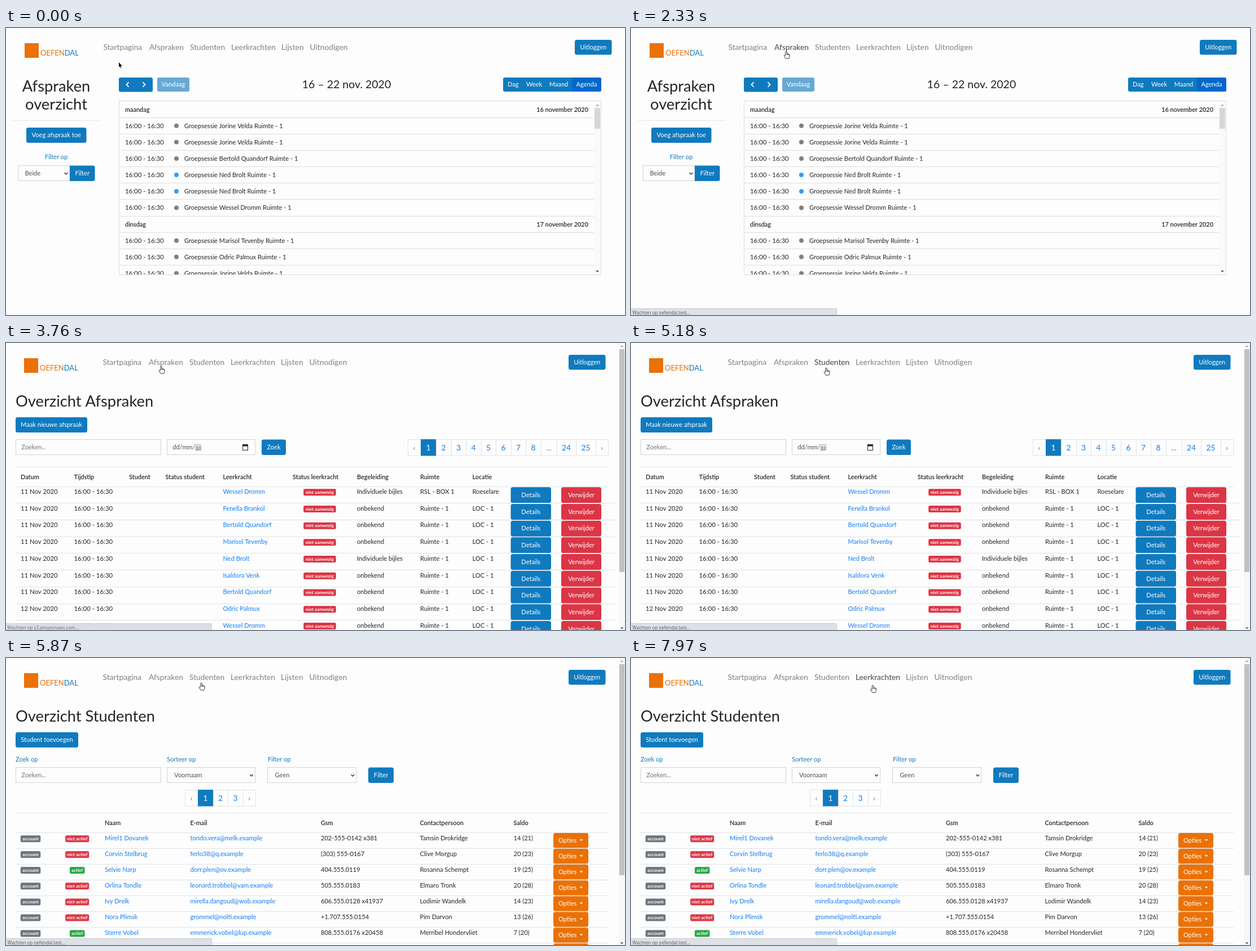
An HTML page with a canvas for the animation above (8 s loop, 1097x510 px).

```html
<!DOCTYPE html>
<html lang="nl">
<head>
<meta charset="utf-8">
<title>Afspraken</title>
<style>
html, body { margin: 0; width: 100%; height: 100%; overflow: hidden; background: #fdfdfd; }
canvas { display: block; }
</style>
</head>
<body>
<canvas id="stage" width="1097" height="510"></canvas>
<script>
const ctx = document.getElementById('stage').getContext('2d');
const LOOP = 8000;
const BG = '#fdfdfd', BLUE = '#107abe', RED = '#dc3545', GREEN = '#28a745', GREY = '#6c757d';
const ORANGE = '#ea7106', LINK = '#147df5', INK = '#212529', LINE = '#dee2e6', FIELD = '#ced4da';
const BODY = 11.1, NAV = 13.8, TITLE = 27.3;
const SITE = 'oefendal.test';

// Drawing helpers
function text(s, x, y, { size = BODY, color = INK, align = 'left', weight = 400, family = 'Lato' } = {}) {
  ctx.font = `${weight} ${size}px ${family}, sans-serif`;
  ctx.textAlign = align;
  ctx.fillStyle = color;
  ctx.fillText(s, x, y);
  return ctx.measureText(s).width;
}
const bold = (s, x, y, align) => text(s, x, y, { size: 10.9, weight: 600, align });

function box(x, y, w, h, color, r = 0) {
  ctx.fillStyle = color;
  ctx.beginPath();
  ctx.roundRect(x, y, w, h, r);
  ctx.fill();
}

function frame(x, y, w, h, color = FIELD) {
  ctx.strokeStyle = color;
  ctx.lineWidth = 1;
  ctx.strokeRect(x, y, w, h);
}

const rule = (x1, x2, y, color = LINE) => box(x1, Math.round(y), x2 - x1, 1, color);

function button(label, x, y, w, h, color = BLUE, r = 3.5) {
  box(x, y, w, h, color, r);
  text(label, x + w / 2, y + h / 2 + 3.8, { color: '#fff', align: 'center' });
}

function badge(label, cx, cy, w, color) {
  box(cx - w / 2, cy - 6, w, 12, color, 2.5);
  text(label, cx, cy + 2.8, { size: 8.2, weight: 700, color: '#fff', align: 'center' });
}

function poly(points, color) {
  ctx.fillStyle = color;
  ctx.beginPath();
  points.forEach(([x, y]) => ctx.lineTo(x, y));
  ctx.closePath();
  ctx.fill();
}
const triangle = (x, y, w, h, color) => poly([[x - w, y - h], [x + w, y - h], [x, y + h]], color);

function chevron(x, y, dx, dy, color, width) {
  ctx.strokeStyle = color;
  ctx.lineWidth = width;
  ctx.beginPath();
  if (dy > 0) { ctx.moveTo(x - dx, y - dy / 2); ctx.lineTo(x, y + dy / 2); ctx.lineTo(x + dx, y - dy / 2); }
  else { ctx.moveTo(x - dx / 2, y + dy); ctx.lineTo(x + dx / 2, y); ctx.lineTo(x - dx / 2, y - dy); }
  ctx.stroke();
}

function select(label, x, y, w, pad) {
  frame(x, y, w, 27);
  text(label, x + pad, y + 17.3, { color: '#495057' });
  chevron(x + w - 6.5, y + 14, 2.8, 3, '#333', 1.4);
}

function input(x, y, w, label, color = GREY) {
  frame(x, y, w, 27);
  text(label, x + 9.8, y + 17.3, { color });
}

function pager(labels, edges, y) {
  labels.forEach((label, i) => {
    const x = edges[i], w = edges[i + 1] - x, active = label === '1';
    if (active) box(x, y, w, 29.5, BLUE);
    else frame(x + .5, y + .5, w, 28.5, LINE);
    const color = active ? '#fff' : '‹...'.includes(label) ? GREY : LINK;
    text(label, x + w / 2, y + 19.8, { size: NAV, color, align: 'center' });
  });
}

// Shared page parts
const links = [
  ['Startpagina', 172.5, 'home'], ['Afspraken', 254, 'meetings'], ['Studenten', 326, 'students'],
  ['Leerkrachten', 399, 'teachers'], ['Lijsten', 488, 'lists'], ['Uitnodigen', 538.5, 'invites']
];

function header(shift, hovered) {
  box(33 - shift, 27, 25, 26, ORANGE);
  const w = text('OEFEN', 61 - shift, 49, { size: 13, color: ORANGE });
  text('DAL', 61 - shift + w, 49, { size: 13, color: BLUE });
  links.forEach(([label, x], i) =>
    text(label, x - shift, 38.5, { size: NAV, color: i === hovered ? '#444' : '#808080' }));
  button('Uitloggen', shift ? 997 : 1008, 21, 65.5, 26.5);
}

function pageScroll(end) {
  box(1086, 0, 11, 510, '#f7f7f7');
  box(1087, 11, 9, end - 11, '#c1c1c1');
  triangle(1091.5, 5.5, 2.7, -1.5, '#a0a0a0');
  triangle(1091.5, 507, 2.7, 1.5, '#505050');
}

// Calendar page
const people = {
  jv: 'Jorine Velda', bq: 'Bertold Quandorf', nb: 'Ned Brolt', wd: 'Wessel Dromm',
  mt: 'Marisol Tevenby', op: 'Odric Palmux', fb: 'Fenella Brankol', iv: 'Isaldora Venk'
};
const agenda = ['maandag|16', 'jv', 'jv', 'bq', 'nb', 'nb', 'wd', 'dinsdag|17', 'mt', 'op', 'jv'];

function calendarPage(hovered) {
  header(0, hovered);
  const big = { size: TITLE, align: 'center' };
  text('Afspraken', 89, 113, big);
  text('overzicht', 89, 145, big);
  rule(11, 168, 164, '#e6e6e6');
  button('Voeg afspraak toe', 36, 177, 106.5, 27);
  text('Filter op', 89, 233.3, { color: BLUE, align: 'center' });
  select('Beide', 21.5, 244.5, 91.5, 12);
  button('Filter', 113, 244.5, 44.5, 27.5, BLUE, [0, 3.5, 3.5, 0]);

  box(200, 88, 60, 25.5, BLUE, 3);
  chevron(215.5, 100.5, -4, -4.2, '#fff', 1.8);
  chevron(244.5, 100.5, 4, -4.2, '#fff', 1.8);
  button('Vandaag', 268, 88, 57, 25, '#67a9d5', 3);
  text('16 – 22 nov. 2020', 603.5, 106.5, { size: 19.5, align: 'center' });
  box(881, 88, 174, 25, BLUE, 3);
  button('Agenda', 1003, 88, 52, 25, '#0467ca', [0, 3, 3, 0]);
  [['Dag', 898.7], ['Week', 936], ['Maand', 979.5]].forEach(([s, x]) =>
    text(s, x, 104.3, { color: '#fff', align: 'center' }));

  ctx.save();
  ctx.beginPath();
  ctx.rect(200, 129, 855, 309.5);
  ctx.clip();
  agenda.forEach((item, i) => {
    const y = 144.5 + 29.15 * i, base = y + 4;
    const [day, date] = item.split('|');
    if (date) {
      bold(day, 211, base);
      bold(date + ' november 2020', 1032, base, 'right');
    } else {
      text('16:00 - 16:30', 211, base, { size: 11.4 });
      box(298, y - 4, 8, 8, item === 'nb' ? '#2f9ff5' : '#808080', 4);
      text(`Groepsessie ${people[item]} Ruimte - 1`, 316, base);
    }
    rule(200, 1042, y + 14.2, '#ddd');
  });
  ctx.restore();
  frame(200.5, 129.5, 854, 309, '#ddd');
  box(1042, 130, 12, 308, '#fafafa');
  box(1043, 142, 10, 37, '#d6d6d6');
  triangle(1048, 137, 2.7, -1.5, '#a0a0a0');
  triangle(1048, 432.5, 2.7, 1.5, '#404040');
}

// Meetings page
const teachers = ['wd', 'fb', 'bq', 'mt', 'nb', 'iv', 'bq', 'op', 'wd'];
const meetingCols = [
  ['Datum', 26], ['Tijdstip', 120.5], ['Student', 218], ['Status student', 282.5], ['Leerkracht', 384.5],
  ['Status leerkracht', 508], ['Begeleiding', 622], ['Ruimte', 734], ['Locatie', 826.5]
];

function meetingsPage(hovered) {
  header(1, hovered);
  text('Overzicht Afspraken', 17, 112.5, { size: TITLE });
  button('Maak nieuwe afspraak', 17, 132, 127, 27);
  input(17.5, 171.5, 257, 'Zoeken...');
  input(285.5, 171.5, 156, 'dd/mm/jjjj', '#495057');
  frame(419.5, 181, 9, 9.5, '#222');
  box(419, 180, 10, 3.5, '#222');
  button('Zoek', 453, 171.5, 43, 27.5);
  pager(['‹', '1', '2', '3', '4', '5', '6', '7', '8', '...', '24', '25', '›'],
    [712, 735, 762, 789, 815, 842, 868, 895, 921, 948, 976, 1010, 1045, 1067], 171);

  rule(17, 1068, 220);
  meetingCols.forEach(([s, x]) => bold(s, x, 241.7));
  teachers.forEach((id, i) => {
    const y = 264 + 29.72 * i, base = y + 4, single = i === 0 || i === 4;
    rule(17, i ? 1079 : 1068, y - 9.5);
    text((i < 7 ? '11' : '12') + ' Nov 2020', 26, base, { size: 11.3 });
    text('16:00 - 16:30', 120.5, base, { size: 11.4 });
    text(people[id], 384.5, base, { color: LINK });
    badge('niet aanwezig', 556, y + 1.2, 57.5, RED);
    text(single ? 'Individuele bijles' : 'onbekend', 622, base);
    text(i ? 'Ruimte - 1' : 'RSL - BOX 1', 734, base);
    text(i ? 'LOC - 1' : 'Roeselare', 826.5, base);
    button('Details', 894.5, y - 7.8, 71.5, 28);
    button('Verwijder', 984, y - 7.8, 71, 28, RED);
  });
  pageScroll(407);
}

// Students page
const students = [
  ['Mirel1 Dovanek', 'tondo.vera@melk.example', '202-555-0142 x381', 'Tamsin Drokridge', '14 (21)'],
  ['Corvin Stelbrug', 'ferlo38@q.example', '(303) 555-0167', 'Clive Morgup', '20 (23)'],
  ['Selvie Narp', 'dorr.plen@ov.example', '404.555.0119', 'Rosanna Schempt', '19 (25)'],
  ['Orlina Tondle', 'leonard.trobbel@vam.example', '505.555.0183', 'Elmaro Tronk', '20 (28)'],
  ['Ivy Drelk', 'mirella.dangoud@wob.example', '606.555.0128 x41937', 'Lodimir Wandelk', '14 (23)'],
  ['Nora Plimsk', 'grommel@nolti.example', '+1.707.555.0154', 'Pim Darvon', '13 (26)'],
  ['Sterre Vobel', 'emmerick.vobel@lup.example', '808.555.0176 x20458', 'Merribel Hondervliet', '7 (20)']
];
const studentCols = [['Naam', 175], ['E-mail', 326.5], ['Gsm', 558], ['Contactpersoon', 733.5], ['Saldo', 899.5]];

function studentsPage(hovered) {
  header(1, hovered);
  text('Overzicht Studenten', 17, 112.5, { size: TITLE });
  button('Student toevoegen', 17, 132, 111, 27);
  [['Zoek op', 17], ['Sorteer op', 285], ['Filter op', 464]].forEach(([s, x]) =>
    text(s, x, 183.8, { color: BLUE }));
  input(17.5, 194.5, 257, 'Zoeken...');
  select('Voornaam', 285.5, 194.5, 156, 12.5);
  select('Geen', 463.5, 194.5, 157.5, 13);
  button('Filter', 642, 194.5, 45, 27.5);
  pager(['‹', '1', '2', '3', '›'], [317, 340, 367, 393, 420, 442], 234);

  rule(17, 1068, 275);
  studentCols.forEach(([s, x]) => bold(s, x, 297.2));
  for (let i = 0; i < 8; i++) {
    const y = 320 + 28.05 * i, row = students[i];
    rule(17, 1068, y - 10);
    box(970, y - 9, 62, 26.5, ORANGE, 3.5);
    text('Opties', 979, y + 7.8, { color: '#fff' });
    triangle(1019.5, y + 3.8, 2.9, 1.5, '#fff');
    if (!row) continue;
    badge('account', 43.5, y + 1.2, 35.5, GREY);
    if (i === 2 || i === 6) badge('actief', 126.2, y + 1.2, 26.5, GREEN);
    else badge('niet actief', 126.2, y + 1.2, 42, RED);
    row.forEach((s, c) => text(s, studentCols[c][1], y + 3.8, { color: c < 2 ? LINK : INK }));
  }
  pageScroll(386);
}

// Pointer: start, end, steps, from, to
const moves = [
  [710, 1440, 15, [200, 61], [275, 41]],
  [3760, 4560, 15, [275, 41], [346, 44]],
  [5870, 6670, 16, [346, 44], [427, 49]],
  [6720, 6930, 4, [427, 49], [428.5, 48]]
];
const clicks = [[1720, 1900], [4610, 4800], [7400, 7530]];
const within = (t, [a, b]) => t >= a && t < b;

function pointerAt(t) {
  let pos = moves[0][3];
  for (const [start, end, steps, from, to] of moves) {
    if (t < start) break;
    const p = Math.min(1, Math.floor((t - start) / (end - start) * steps + .01) / steps);
    const e = p * p * (3 - 2 * p);
    pos = from.map((v, i) => v + (to[i] - v) * e);
  }
  return pos;
}

function linkAt([x, y]) {
  if (y > 50 || x < 166 || x > 609) return -1;
  return links.findLastIndex(link => x >= link[1] - 6.5);
}

function drawPointer([x, y], hand) {
  ctx.save();
  ctx.translate(x, y);
  ctx.lineJoin = 'round';
  if (hand) {
    const shape = new Path2D('M-1.2 8V1Q0 -.6 1.2 1V4.6Q2.4 4 3 5Q4.2 4.6 4.7 5.6Q6 5.4 6 6.8V9.5L4.8 13.2H-.8L-3.6 8.8Q-4.2 7 -2.7 7Z');
    ctx.fillStyle = '#fff';
    ctx.fill(shape);
    ctx.strokeStyle = '#222';
    ctx.lineWidth = .9;
    ctx.stroke(shape);
    ctx.stroke(new Path2D('M1.2 4.6V7M3 5V7M4.7 5.8V7.4'));
  } else {
    const shape = new Path2D('M0 0V8.8L2 7L3.3 10L4.6 9.4L3.3 6.5H5.8Z');
    ctx.strokeStyle = '#fff';
    ctx.lineWidth = 1.4;
    ctx.stroke(shape);
    ctx.fillStyle = '#000';
    ctx.fill(shape);
  }
  ctx.restore();
}

// Browser status bubble
const loading = [
  [1900, 3250, SITE], [3400, 3810, 's3.amazonaws.com'], [5180, 5920, SITE], [7970, LOOP, SITE]
];

function drawStatus(t, hovered) {
  const wait = loading.find(span => within(t, span));
  if (!wait && hovered < 0) return;
  const label = wait ? `Wachten op ${wait[2]}...` : `${SITE}/${links[hovered][2]}`;
  const style = { size: 8, color: '#5c6064', family: '"Noto Sans"' };
  ctx.font = '400 8px "Noto Sans", sans-serif';
  const w = wait ? 365 : ctx.measureText(label).width + 8;
  ctx.save();
  if (within(t, [3070, 3250])) ctx.globalAlpha = 1 - (Math.floor((t - 3070) / 90) + 1) / 3;
  if (within(t, [3760, 3810])) ctx.globalAlpha = .85;
  box(-1, 498, w + 1, 13, '#c8cbd0', [0, 3, 0, 0]);
  box(-1, 499, w, 12, '#dee1e6', [0, 2.5, 0, 0]);
  text(label, 2.5, 509, style);
  ctx.restore();
}

function draw(t) {
  box(0, 0, 1097, 510, BG);
  const pos = pointerAt(t), over = linkAt(pos);
  // A fresh page shows no hover until the pointer moves
  const fresh = within(t, [2790, 3810]) || within(t, [5640, 5920]);
  const hovered = fresh ? -1 : over;
  const page = t < 2790 ? calendarPage : t < 5640 ? meetingsPage : studentsPage;
  page(hovered);
  drawStatus(t, hovered);
  if (clicks.some(span => within(t, span))) box(pos[0] - 9, pos[1] - 9, 18, 18, 'rgba(255,255,0,.47)', 9);
  drawPointer(pos, over >= 0);
}

const begin = performance.now();
function tick() {
  draw((performance.now() - begin) % LOOP);
  requestAnimationFrame(tick);
}
tick();
</script>
</body>
</html>
```
